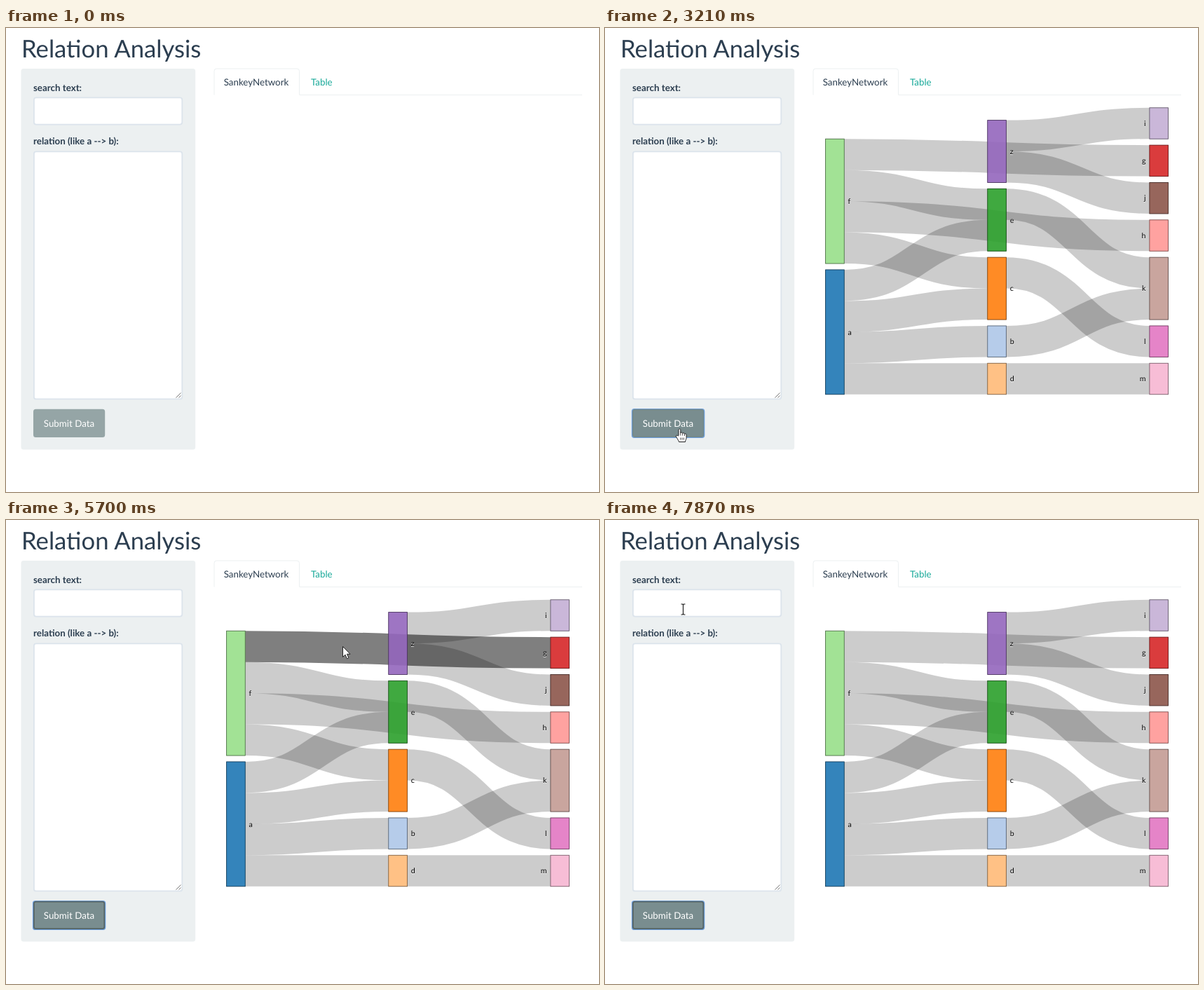
Animation of 846x662 px, one loop 8000 ms. Source, as an HTML page:

```html
<!DOCTYPE html>
<html lang="en">
<head>
<meta charset="utf-8">
<title>Relation Analysis</title>
<style>
  html, body { margin: 0; width: 100%; height: 100%; overflow: hidden; background: #fff; }
  svg { display: block; }
  text { font: 13.35px Lato, sans-serif; fill: #2c3e50; white-space: pre; text-rendering: geometricPrecision; }
  .title { font-size: 34.7px; }
  .label { font-weight: bold; }
  .field { fill: #fff; stroke: #dce4ec; stroke-width: 1.8; }
  .field.focus { stroke: #2c3e50; }
  .link { fill: none; stroke: #000; stroke-width: 50; stroke-opacity: .2; }
  .link.on { stroke-opacity: .5; }
  .node text { font-size: 12px; fill: #000; text-shadow: 0 1px 0 #fff; }
  .node rect { fill-opacity: .9; }
  .cursor { stroke-linejoin: round; }
</style>
</head>
<body>
<svg width="846" height="662" viewBox="0 0 846 662">
  <text class="title" x="22" y="42">Relation Analysis</text>
  <rect x="21.5" y="58" width="248.7" height="543.5" rx="3.5" fill="#ecf0f1"/>

  <text class="label" x="39" y="89.5">search text:</text>
  <rect class="field" x="39.9" y="99.4" width="211.4" height="38.2" rx="3"/>
  <text class="label" x="39" y="165.7">relation (like a --&gt; b):</text>
  <rect class="field" id="area" x="39.9" y="176.4" width="211.4" height="353" rx="3"/>
  <path d="M242.5 527.5l7-7M246.5 527.5l3-3" stroke="#777" fill="none"/>
  <g id="lines"></g>
  <path id="caret" stroke="#2c3e50"/>

  <rect id="ring" x="38.7" y="543.7" width="102.8" height="40.6" rx="3" fill="none" stroke="#6da0e0" stroke-width="1.6"/>
  <rect id="button" x="39.9" y="544.7" width="100.4" height="38.4" rx="2.6" stroke-width="1.8"/>
  <text x="90" y="568.6" text-anchor="middle" style="fill:#fff">Submit Data</text>

  <path d="M297 95.5V61.5a3.5 3.5 0 0 1 3.5-3.5H415a3.5 3.5 0 0 1 3.5 3.5V95.5H822" fill="none" stroke="#ecf0f1"/>
  <text x="310.7" y="81.5">SankeyNetwork</text>
  <text x="435" y="81.5" style="fill:#18a999">Table</text>

  <g id="chart" transform="translate(314.6 113.8) scale(.889)"></g>

  <g class="cursor" id="beam">
    <path d="M-3-7.5H-1L0-6.5 1-7.5H3M0-6.5V6.5M-3 7.5H-1L0 6.5 1 7.5H3" fill="none" stroke="#222" stroke-width="1.2"/>
  </g>
  <path class="cursor" id="arrow" d="M.5.5V15.5L4 12.2 6.4 17.8 8.9 16.7 6.5 11.3H11Z" fill="#fff" stroke="#222"/>
  <g class="cursor" id="hand">
    <path d="M-2.5 10V2C-2.5 0 .3 0 .3 2V6.5C1 5 3 5.2 3.2 7 4 5.8 5.8 6 6 7.8 7 7 8.6 7.4 8.6 9V13C8.6 15.5 7.2 16 7 19H-2C-2.6 16.5-4.5 14.5-6 11.6-6.8 9.8-4.6 8.8-3.4 10.6Z" fill="#fff" stroke="#222"/>
    <path d="M.3 6.5V10M3.2 7V10M6 7.8V10.5M.3 13V16M2.6 13V16M4.9 13V16" stroke="#222" stroke-width=".8"/>
  </g>
</svg>
<script>
const $ = id => document.getElementById(id);

function add(parent, tag, attributes, text = '') {
  const el = document.createElementNS('http://www.w3.org/2000/svg', tag);
  for (const key in attributes) el.setAttribute(key, attributes[key]);
  el.textContent = text;
  parent.append(el);
  return el;
}

// Pasted relations
'ab ac ad ae fc fe fg fh zi zj bk cl dm ek'.split(' ').forEach(([from, to], i) =>
  add($('lines'), 'text', { x: 54, y: 199.8 + i * 18.69 }, `${from}-->${to}`));

// Nodes: column, top, height, colour
const nodes = {
  f: [0, 50, 200, '#98df8a'], a: [0, 260, 200, '#1f77b4'],
  z: [1, 20, 100, '#9467bd'], e: [1, 130, 100, '#2ca02c'], c: [1, 240, 100, '#ff7f0e'],
  b: [1, 350, 50, '#aec7e8'], d: [1, 410, 50, '#ffbb78'],
  i: [2, 0, 50, '#c5b0d5'], g: [2, 60, 50, '#d62728'], j: [2, 120, 50, '#8c564b'],
  h: [2, 180, 50, '#ff9896'], k: [2, 240, 100, '#c49c94'], l: [2, 350, 50, '#e377c2'],
  m: [2, 410, 50, '#f7b6d2']
};

// Links: left node, right node, slot on the left, slot on the right
const links = {};
for (const [from, to, out, into] of 'fg00 fe10 fh20 fc30 ae01 ac11 ab20 ad30 zi00 zj10 ek00 cl00 bk01 dm00'.split(' ')) {
  const x0 = nodes[from][0] * 260 + 30, x1 = nodes[to][0] * 260, mid = (x0 + x1) / 2;
  const y0 = nodes[from][1] + out * 50 + 25, y1 = nodes[to][1] + into * 50 + 25;
  links[from + to] = add($('chart'), 'path', { d: `M${x0} ${y0}C${mid} ${y0} ${mid} ${y1} ${x1} ${y1}` });
}

const darker = hex => `rgb(${hex.match(/\w\w/g).map(v => Math.round(parseInt(v, 16) * .49))})`;
for (const name in nodes) {
  const [column, y, height, fill] = nodes[name], last = column === 2;
  const group = add($('chart'), 'g', { class: 'node', transform: `translate(${column * 260} ${y})` });
  add(group, 'rect', { width: 30, height, fill, stroke: darker(fill) });
  add(group, 'text', { x: last ? -6 : 36, y: height / 2 + 4.2, 'text-anchor': last ? 'end' : 'start' }, name);
}

// Each step changes part of the state
const steps = [
  [0, { cursor: [], focus: '', caret: '', lines: false, hover: false, chart: false, on: [] }],
  [730, { cursor: ['beam', 141, 317] }],
  [980, { focus: 'area', caret: 'M54.5 187V203' }],
  [1280, { caret: '' }],
  [1680, { lines: true, caret: 'M86.5 430V445' }],
  [2150, { caret: '' }],
  [2210, { cursor: [] }],
  [2840, { cursor: ['hand', 107.5, 571.5], hover: true }],
  [2910, { focus: 'button' }],
  [3210, { lines: false, chart: true }],
  [4300, { cursor: ['beam', 136.5, 164.5], hover: false }],
  [4600, { cursor: ['beam', 127.5, 128] }],
  [5000, { cursor: [] }],
  [5070, { cursor: ['arrow', 505.5, 292.5], on: ['ae'] }],
  [5700, { cursor: ['arrow', 480, 180], on: ['fg'] }],
  [5930, { cursor: ['arrow', 440, 325], on: ['fc'] }],
  [6180, { cursor: ['arrow', 443.5, 501.5], on: ['ad'] }],
  [6630, { cursor: ['arrow', 640, 430], on: ['bk'] }],
  [6780, { cursor: ['arrow', 690, 318], on: ['ek'] }],
  [7180, { cursor: ['arrow', 790.5, 362], on: ['ek', 'bk'] }],
  [7560, { cursor: ['beam', 204, 242], on: [] }],
  [7870, { cursor: ['beam', 111.5, 127.5] }]
];

const show = (id, visible) => $(id).setAttribute('visibility', visible ? 'visible' : 'hidden');

function draw(now) {
  const time = now % 8000;
  const state = Object.assign({}, ...steps.filter(([start]) => start <= time).map(step => step[1]));
  const pressed = state.focus === 'button';

  $('area').classList.toggle('focus', state.focus === 'area');
  show('lines', state.lines);
  $('caret').setAttribute('d', state.caret);
  show('ring', pressed);
  $('button').setAttribute('fill', state.hover || pressed ? '#798d8f' : '#95a5a6');
  $('button').setAttribute('stroke', state.hover ? '#74898a' : pressed ? '#566566' : '#95a5a6');
  show('chart', state.chart);
  for (const name in links) links[name].setAttribute('class', state.on.includes(name) ? 'link on' : 'link');

  const [shape, x, y] = state.cursor;
  for (const id of ['beam', 'arrow', 'hand']) show(id, id === shape);
  if (shape) $(shape).setAttribute('transform', `translate(${x} ${y})`);
  requestAnimationFrame(draw);
}
requestAnimationFrame(draw);
</script>
</body>
</html>
```
